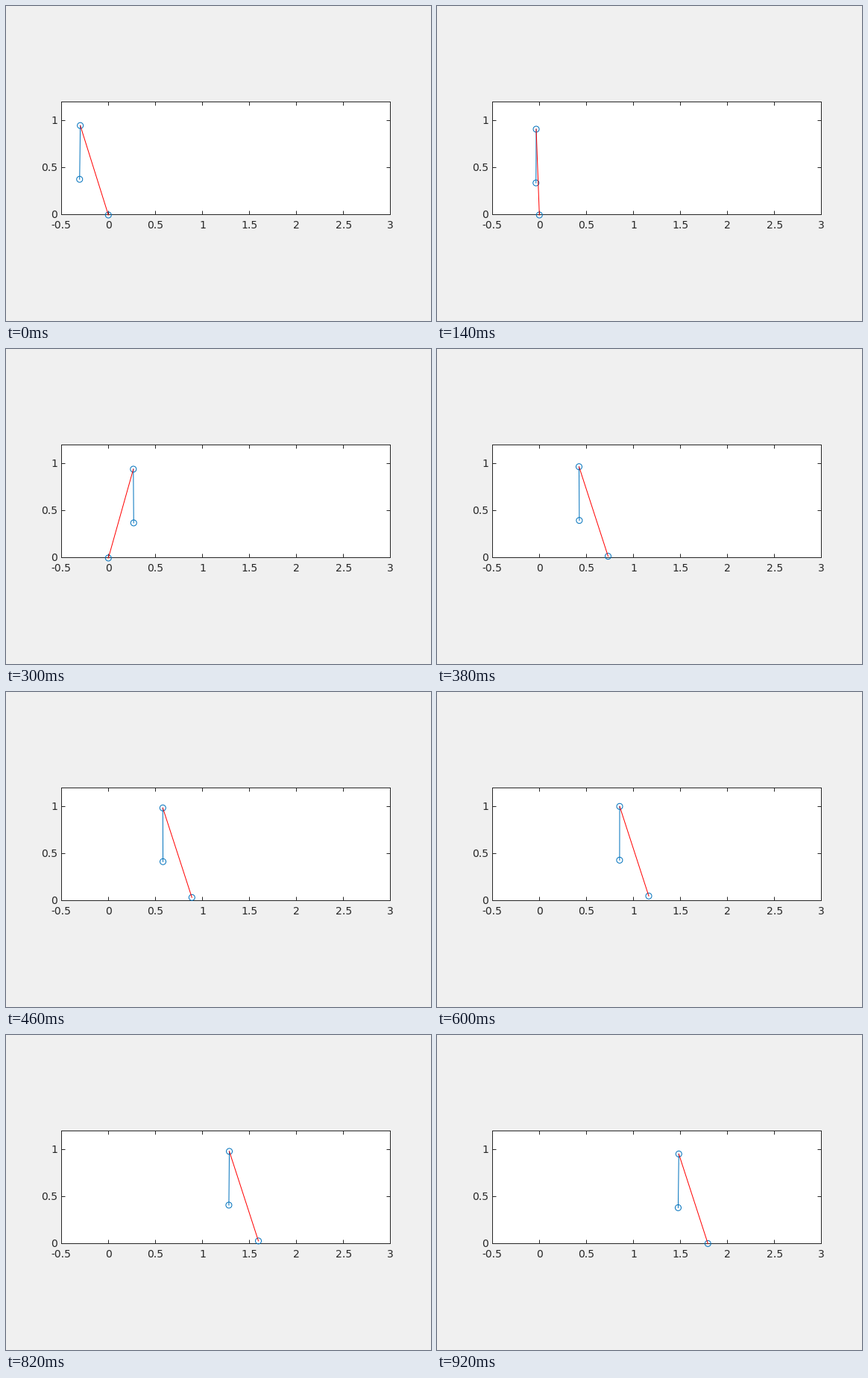
A matplotlib script that plays this animation: 570 px wide and 422 px high, repeating every 0.94 s.

```python
import numpy as np
import matplotlib.pyplot as plt
from matplotlib.animation import FuncAnimation
from matplotlib.patches import Circle, Rectangle

W, H, DPI = 570, 422, 100
PT = 72 / DPI                      # points per pixel
FRAMES, INTERVAL = 47, 20
BLUE, RED, INK = "#0072bd", "#ff0000", "#262626"

# exact plot box; its lines are drawn on the nearest pixel centres
X0, Y0, UNIT = 137.2, 279.35, 126.2
LEFT, RIGHT, TOP, BOTTOM = 74.5, 515.5, 128.5, 279.5
TICK = 4.5

FOOT = np.array([137.3, 280.0])    # foot position while on the ground
LEG = np.array([39.0, 120.0])      # hip to foot while in the air
LIFTOFF = 16                       # last step with the foot down
ROD = 72.0

fig = plt.figure(figsize=(W / DPI, H / DPI), dpi=DPI, facecolor="#f0f0f0")
ax = fig.add_axes([0, 0, 1, 1])
ax.set_xlim(0, W)
ax.set_ylim(H, 0)
ax.axis("off")


def rule(x0, y0, x1, y1):
    ax.plot([x0, x1], [y0, y1], color=INK, lw=PT, zorder=2, snap=False,
            solid_capstyle="projecting")


def label(x, y, value, ha):
    ax.text(x, y, f"{value:g}", ha=ha, va="baseline", color=INK,
            family="DejaVu Sans", fontsize=14 * PT)


def draw_axes():
    ax.add_patch(Rectangle((LEFT, TOP), RIGHT - LEFT, BOTTOM - TOP,
                           fc="white", ec="none", zorder=1, snap=False))
    for y in (TOP, BOTTOM):
        rule(LEFT, y, RIGHT, y)
    for x in (LEFT, RIGHT):
        rule(x, TOP, x, BOTTOM)
    for value in np.arange(-0.5, 3.01, 0.5):
        exact = X0 + value * UNIT
        x = np.floor(exact) + 0.5
        rule(x, BOTTOM, x, BOTTOM - TICK)
        rule(x, TOP, x, TOP + TICK)
        label(exact, 298, value, "center")
    for value in (0, 0.5, 1):
        exact = Y0 - value * UNIT
        y = np.floor(exact) + 0.5
        rule(LEFT, y, LEFT + TICK, y)
        rule(RIGHT, y, RIGHT - TICK, y)
        label(69, exact + 5, value, "right")


def pose(n):
    """Hip, foot and lower mass at step n."""
    if n <= LIFTOFF:
        u = n - 7.92               # time from mid-stance
        hip = np.array([FOOT[0] + 4.63 * u + 0.002 * u**3,
                        165.1 - 0.0987 * u**2 + 0.000322 * u**4])
        foot = FOOT
    else:
        hip = np.array([210.3 + 4.957 * (n - 23),
                        153.25 + 0.0288 * (n - 31.4)**2])
        foot = hip + LEG
    sway = np.interp(n, [0, LIFTOFF, FRAMES - 1], [-0.9, 0.55, -0.85])
    return hip, foot, hip + [sway, ROD]


draw_axes()
joints = [ax.add_patch(Circle((0, 0), 4, fc="none", ec=BLUE, lw=PT, zorder=4))
          for _ in range(3)]
rod, = ax.plot([], [], color=BLUE, lw=PT, zorder=5, snap=False)
leg, = ax.plot([], [], color=RED, lw=PT, zorder=6, snap=False)


def update(n):
    hip, foot, mass = pose(n)
    for joint, point in zip(joints, (hip, foot, mass)):
        joint.center = tuple(point)
    rod.set_data(*zip(hip, mass))
    leg.set_data(*zip(hip, foot))
    return [*joints, rod, leg]


anim = FuncAnimation(fig, update, frames=FRAMES, interval=INTERVAL,
                     repeat=True, repeat_delay=0, blit=False)
plt.show()
```
